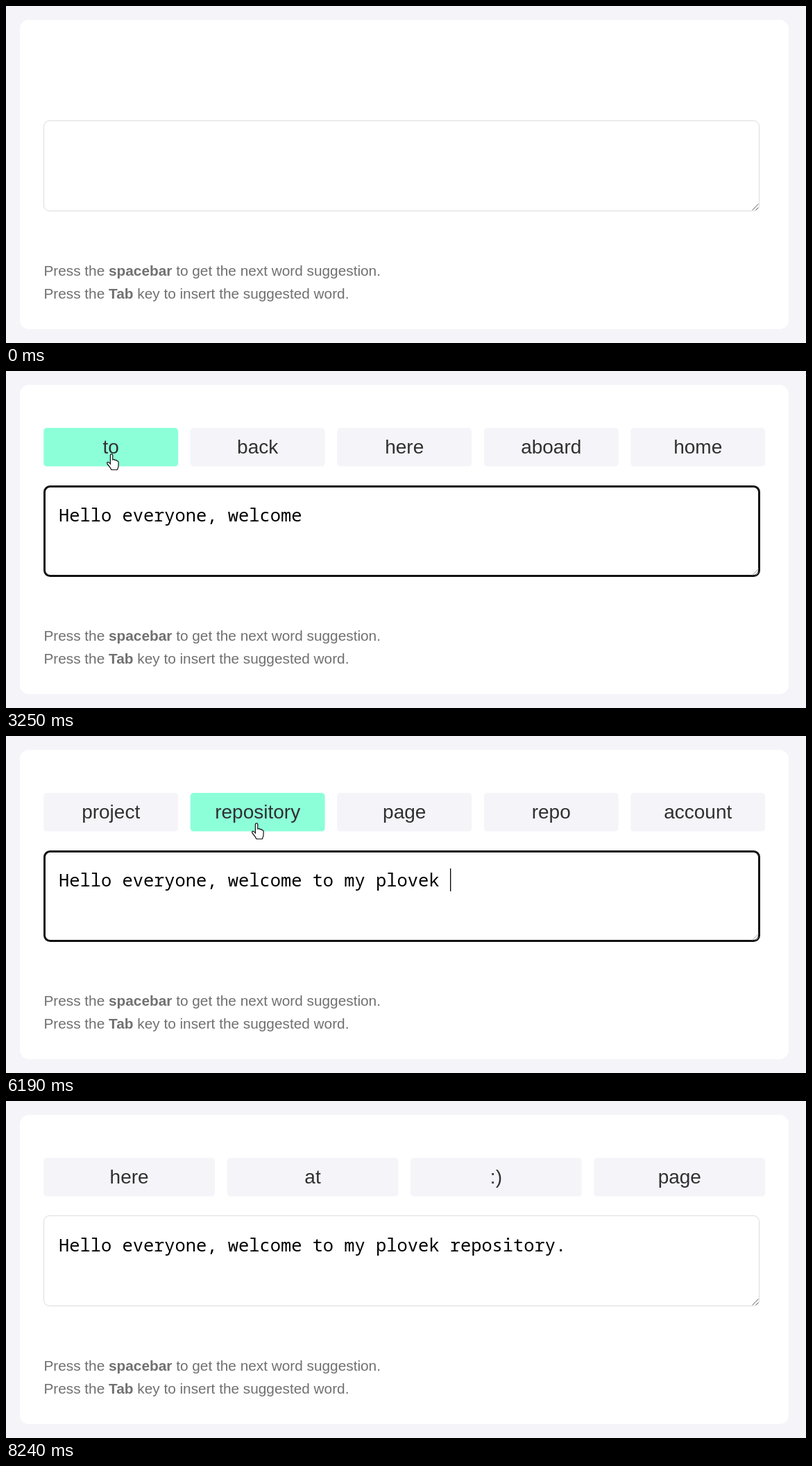
Recreate the animation shown at these times as an HTML page with a canvas. Size 1153 px wide and 486 px high, loop 8.27 s.

```html
<!DOCTYPE html>
<html lang="en">
<head>
<meta charset="utf-8">
<title>Next word suggestion</title>
<style>
  html, body { margin: 0; width: 100%; height: 100%; overflow: hidden; background: #f4f4f9; }
  canvas { display: block; }
</style>
</head>
<body>
<canvas id="stage" width="1153" height="486"></canvas>
<script>
const ctx = document.getElementById('stage').getContext('2d');
const LOOP = 8270, BLINK = 260, FADE = 150;
const FOCUS = 390, BLUR = 8240;
const SANS = '"Liberation Sans", Arial, sans-serif';
const MONO = '25.4px "Noto Sans Mono", monospace';
const CHAR = 15.24;

// Each edit holds the whole text from its time on and restarts the caret blink.
const edits = [{ at: 0, text: '' }, { at: FOCUS, text: '' }];
function type(start, step, added) {
  const chars = step ? [...added] : [added];
  chars.forEach((c, i) => edits.push({ at: start + i * step, text: edits.at(-1).text + c }));
}
type(640, 49.2, 'Hello everyone,');
type(1590, 0, '');
type(1600, 0, ' ');
type(2030, 58.5, 'welcome ');
type(3330, 0, 'to');
type(3740, 66, ' my ');
type(4200, 65, 'plo');
type(4470, 50, 'vek');
type(5370, 0, '');
type(5630, 0, ' ');
type(6560, 0, 'repository');
type(7480, 0, '.');

const suggestions = [
  { at: 0, words: [] },
  { at: 960, words: ['there', 'world', 'and', 'my', 'guys'] },
  { at: 1700, words: ['how', 'I', 'this', 'we', 'there'] },
  { at: 2500, words: ['to', 'back', 'here', 'aboard', 'home'] },
  { at: 3330, words: ['the', 'Dovnit', 'our', 'Tolvandia', 'IRC'] },
  { at: 4000, words: ['blog', 'website', 'site', 'home', 'homepage'] },
  { at: 5680, words: ['project', 'repository', 'page', 'repo', 'account'] },
  { at: 6560, words: ['here', 'at', ':)', 'page'] },
];

const hovers = [
  { button: 0, from: 3085, to: 3392 },
  { button: 1, from: 6010, to: 6610 },
];

// Pointer path: time, x, y
const path = [
  [30, 330, 147], [320, 252, 214], [2900, 252, 214], [3130, 152, 120], [3330, 152, 120],
  [3390, 245, 134], [3500, 676, 188], [3600, 742, 191], [5700, 742, 191], [6080, 361, 126],
  [6560, 361, 126], [6680, 497, 168], [6880, 789, 193], [7750, 789, 193], [8010, 1104, 500],
];

const arrow = new Path2D('M0 0V16L3.8 12.4 6.4 18.4 8.8 17.4 6.3 11.6H11.4Z');
const hand = new Path2D('M-1.6 13V1.5a1.7 1.7 0 0 1 3.4 0V8q3-1 3.3.8 2.6-.8 3 1 1.9-.2 2 1.6V16' +
  'q0 3-1.8 6.5H0q-2-4-6-8.5-1-2.6 1-2.6 1.5 0 3.4 2.6Z');
const beam = new Path2D('M-3.5-7.5H-1L.5-6.5 2-7.5H4.5M.5-6.5V6.5M-3.5 7.5H-1L.5 6.5 2 7.5H4.5');

const clamp = v => Math.max(0, Math.min(1, v));
const current = (list, t) => list.findLast(item => item.at <= t);

function box(x, y, w, h, r, fill, stroke, line) {
  ctx.beginPath();
  ctx.roundRect(x, y, w, h, r);
  ctx.fillStyle = fill;
  ctx.fill();
  if (stroke) {
    ctx.strokeStyle = stroke;
    ctx.lineWidth = line;
    ctx.stroke();
  }
}

function write(text, x, y, font, color, align = 'left') {
  ctx.font = font;
  ctx.fillStyle = color;
  ctx.textAlign = align;
  ctx.fillText(text, x, y);
  return x + ctx.measureText(text).width;
}

function hint(y, before, key, after) {
  const plain = '20.8px ' + SANS, gray = '#707070';
  let x = write(before, 54.4, y, plain, gray);
  x = write(key, x, y, 'bold ' + plain, gray);
  write(after, x, y, plain, gray);
}

function hoverAmount(button, t) {
  return Math.max(...hovers.map(h =>
    h.button === button ? clamp((t - h.from) / FADE) - clamp((t - h.to) / FADE) : 0));
}

function drawButtons(t) {
  const { words } = current(suggestions, t);
  const gap = 17.6, width = (1040 - gap * (words.length - 1)) / words.length;
  words.forEach((word, i) => {
    const x = 54.2 + i * (width + gap), k = hoverAmount(i, t);
    const mix = (a, b) => Math.round(a + (b - a) * k);
    box(x, 82, width, 55.6, 5, `rgb(${mix(244, 140)},${mix(244, 255)},${mix(249, 217)})`);
    write(word, x + width / 2, 119, '28px ' + SANS, '#303030', 'center');
  });
}

function drawTextarea(t) {
  const focused = t >= FOCUS && t < BLUR;
  if (focused) box(55.5, 166.5, 1030, 129, 8, '#fff', '#111', 3);
  else box(54.5, 165.5, 1031, 130, 8, '#fff', '#dcdcdc', 1);

  ctx.beginPath();
  ctx.moveTo(1075.5, 294.5);
  ctx.lineTo(1084.5, 285.5);
  ctx.moveTo(1080.5, 294.5);
  ctx.lineTo(1084.5, 290.5);
  ctx.strokeStyle = focused ? '#aaa' : '#666';
  ctx.lineWidth = 1;
  ctx.stroke();

  const { at, text } = current(edits, t);
  write(text, 76, 217, MONO, '#000');
  if (focused && Math.floor((t - at) / BLINK) % 2 === 0) {
    ctx.fillStyle = '#000';
    ctx.fillRect(Math.round(75.8 + text.length * CHAR), 191, 1.3, 33);
  }
}

function drawPointer(t) {
  const next = path.findIndex(p => p[0] > t);
  if (next < 1) return;
  const [t0, x0, y0] = path[next - 1], [t1, x1, y1] = path[next];
  const k = (t - t0) / (t1 - t0);
  const x = Math.round(x0 + (x1 - x0) * k), y = Math.round(y0 + (y1 - y0) * k);
  ctx.save();
  ctx.translate(x, y);
  ctx.lineWidth = 1.2;
  if (y >= 165 && y < 296 && x < 1086) {
    ctx.strokeStyle = '#444';
    ctx.stroke(beam);
  } else {
    const shape = y < 138 ? hand : arrow;
    ctx.fillStyle = '#fff';
    ctx.strokeStyle = '#111';
    ctx.fill(shape);
    ctx.stroke(shape);
  }
  ctx.restore();
}

function draw(now) {
  const t = now % LOOP;
  ctx.fillStyle = '#f4f4f9';
  ctx.fillRect(0, 0, 1153, 486);
  box(20, 20, 1108, 446, 13, '#fff');
  drawButtons(t);
  drawTextarea(t);
  hint(389, 'Press the ', 'spacebar', ' to get the next word suggestion.');
  hint(422, 'Press the ', 'Tab', ' key to insert the suggested word.');
  drawPointer(t);
}

const start = performance.now();
function tick() {
  draw(performance.now() - start);
  requestAnimationFrame(tick);
}
tick();
</script>
</body>
</html>
```
